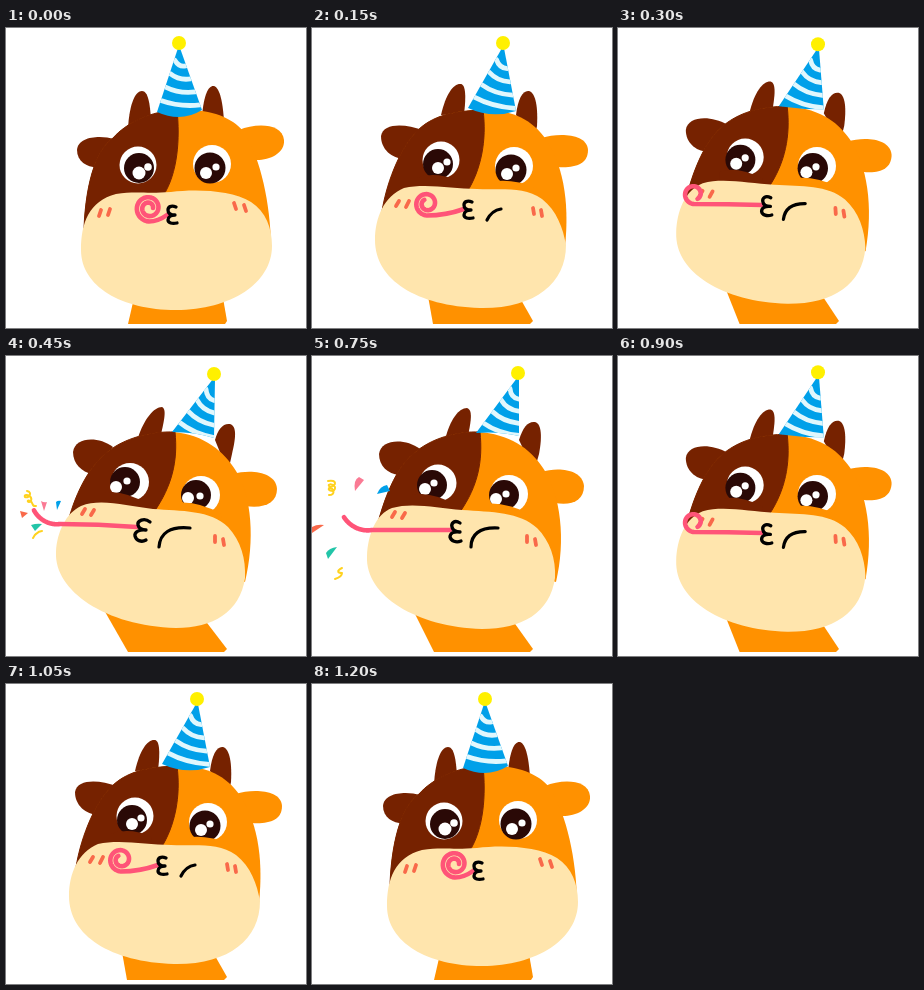
An HTML page with a canvas that plays this animation: 300 px wide and 300 px high, repeating every 1550 ms.

```html
<!DOCTYPE html>
<html lang="en">
<head>
<meta charset="utf-8">
<title>Party calf</title>
<style>
html, body { margin: 0; width: 100%; height: 100%; overflow: hidden; background: #fff; }
canvas { display: block; width: 300px; height: 300px; }
</style>
</head>
<body>
<canvas id="stage" width="300" height="300"></canvas>
<script>
const ctx = document.getElementById('stage').getContext('2d');
const BROWN = '#762200', ORANGE = '#ff9100', CREAM = '#ffe5ad', PINK = '#ff5478';
const BLUE = '#00a0e9', STRIPE = '#e0f7fd', BLUSH = '#f9694a', DARK = '#2a0906';

// Every pose shares the same structure, so any two can be blended number by number.
// hat: apex, left, right, base control; blower: mouth, coil centre, outer r, inner r, turns
const rest = {
  neck: 'M128 270L122 296L219 296L221 293L217 270Z',
  hornL: 'M122 101C123 80 128 63 136 63C142 63 144 75 145 92Z',
  hornR: 'M196 88C198 65 203 57 208 58C214 60 217 75 218 94L208 110Z',
  earL: 'M108 111C95 107 72 108 71 122C71 135 84 141 95 139Z',
  earR: 'M233 102C250 95 276 95 278 112C279 126 262 133 248 132Z',
  head: 'M78 200C80 150 92 120 107 110C120 95 145 83 171 82C200 80 225 88 237 103C252 125 263 165 265 212Z',
  patch: 'M78 200C80 150 92 120 107 110C120 95 145 83 171 82C174 110 172 145 157 168L110 200Z',
  eyes: '132 137 18.5 133 140 15 133 145 6.5 142 139 3.8 206 136 19 204 140 15.5 200 145 6 210 139 3.6',
  lidL: '',
  lidR: '',
  muzzle: 'M75 222C75 195 83 173 110 166C130 163 140 166 165 164C190 161 225 162 245 174C260 184 266 200 266 218C266 255 225 282 170 282C115 282 75 258 75 222Z',
  blush: 'M95 182L93 188M104 181L102 187M228 175L230 181M238 177L240 183',
  mouth: 'M170 179C165 177 162 179 162 182C162 186 166 187 169 187C165 187 162 189 162 192C162 195 166 196 171 195',
  crease: '',
  pom: '173 15 7',
  hat: '173 20 151 84 196 82 175 95',
  blower: '161 187 143 180 13.5 4 1.75'
};
const puff = {
  neck: 'M116 268L121 296L218 296L221 293L208 270Z',
  hornL: 'M129 87C134 65 142 55 149 56C154 57 154 70 152 86Z',
  hornR: 'M204 87C206 70 211 62 217 63C224 65 226 80 225 98L222 112Z',
  earL: 'M110 102C95 96 71 94 69 108C69 122 80 130 92 131Z',
  earR: 'M230 110C245 105 275 105 276 122C276 137 262 140 246 139Z',
  head: 'M69 190C73 157 88 120 105 103C120 88 140 83 168 82C200 81 220 92 233 110C250 135 258 170 253 219Z',
  patch: 'M69 190C73 157 88 120 105 103C120 88 140 83 171 82C175 112 169 142 155 164L100 200Z',
  eyes: '129 132 18.5 126 136 15 126 140 6 135 134 3.6 202 138 19 199 142 15.5 195 146 6 204 140 3.6',
  lidL: 'M104 150Q124 143 146 153L144 160L104 160Z',
  lidR: 'M178 154Q200 150 224 160L224 168L178 164Z',
  muzzle: 'M63 212C63 190 72 168 92 160C115 155 140 161 165 161C190 162 212 158 230 171C245 183 251 200 254 217C254 256 222 281 168 280C105 278 63 252 63 212Z',
  blush: 'M87 173L84 178M97 173L94 179M221 180L222 186M229 182L230 188',
  mouth: 'M160 174C155 172 152 174 152 177C152 181 156 182 159 182C155 182 152 184 152 187C152 190 156 191 161 190',
  crease: 'M175 192C178 186 182 182 189 181',
  pom: '191 15 7',
  hat: '191 20 156 80 204 83 180 91',
  blower: '152 181 115 175.5 12 4.5 1.4'
};
const blow = {
  neck: 'M98 254L122 296L218 296L221 293L198 263Z',
  hornL: 'M132 82C138 63 148 51 156 51C161 53 158 65 155 79Z',
  hornR: 'M209 84C212 73 217 67 224 68C231 70 230 82 226 98L222 116Z',
  earL: 'M107 91C92 80 69 81 67 96C67 108 76 116 86 118Z',
  earR: 'M227 118C245 113 270 116 271 133C271 147 258 153 239 150Z',
  head: 'M61 170C68 140 82 112 100 97C118 82 145 75 168 76C198 79 218 95 230 115C246 140 249 185 239 226Z',
  patch: 'M61 170C68 140 82 112 100 97C118 82 145 75 169 76C172 105 166 130 148 156L100 190Z',
  eyes: '124 126 19 119 126 15 110 131 6 121 125 3.6 195 139 19 190 139 15 182 142 6 194 140 3.6',
  lidL: 'M98 137Q116 133 142 148L142 152L98 148Z',
  lidR: 'M170 147Q190 144 216 158L214 166L170 160Z',
  muzzle: 'M50 196C51 176 60 157 75 150C95 142 120 150 147 153C175 155 205 154 222 171C235 185 240 203 239 222C234 256 207 272 170 272C100 270 48 235 50 196Z',
  blush: 'M79 153L76 158M88 154L85 159M209 180L209 186M217 183L218 189',
  mouth: 'M144 166C138 161 131 165 132 169C133 173 137 174 140 174C134 173 128 176 129 180C130 184 135 187 140 184',
  crease: 'M153 191C154 177 164 170 184 172',
  pom: '208 18 7',
  hat: '208 23 166 76 208 82 190 76',
  blower: '131 171 54 144 24 28 .19'
};
const hold = {
  neck: 'M102 256L122 296L218 296L221 293L201 265Z',
  hornL: 'M133 84C138 63 147 52 155 52C161 54 159 65 156 80Z',
  hornR: 'M207 84C211 71 216 65 223 66C230 68 230 82 227 98L222 116Z',
  earL: 'M108 93C93 82 69 83 67 98C67 110 76 118 87 119Z',
  earR: 'M229 116C246 111 270 113 272 130C272 145 259 150 243 147Z',
  head: 'M64 174C72 142 84 112 101 98C119 82 145 75 166 76C197 78 218 92 231 112C249 138 254 185 244 226Z',
  patch: 'M64 174C72 142 84 112 101 98C119 82 145 75 168 76C171 105 166 130 148 156L100 190Z',
  eyes: '126 127 18.5 120 129 15 113 133 6 122 127 3.6 197 138 19 192 139 15 184 143 6 194 138 3.6',
  lidL: 'M100 139Q118 135 144 149L144 153L100 150Z',
  lidR: 'M172 148Q192 145 218 158L216 166L172 160Z',
  muzzle: 'M55 200C56 178 64 158 80 152C100 146 125 152 150 154C180 156 208 156 225 172C238 185 244 203 243 222C238 257 210 273 170 273C105 271 53 240 55 200Z',
  blush: 'M83 156L80 161M93 157L90 162M215 180L215 186M223 183L224 189',
  mouth: 'M148 167C142 163 139 168 140 171C141 175 145 176 148 176C142 175 138 177 138 181C139 185 144 187 149 185',
  crease: 'M159 191C159 179 167 171 186 172',
  pom: '206 17 7',
  hat: '206 22 164 77 207 80 186 75',
  blower: '138 174 60 148 26 31 .18'
};

// Confetti: colour, start path, end path, stroked?
const confetti = [
  ['#ffd21f', 'M21 135C27 136 23 143 19 141C17 137 27 139 25 145C22 148 20 143 24 145C28 146 25 151 30 150',
    'M16 125C25 123 25 130 18 131C14 128 20 127 23 131C24 137 15 135 17 132C22 132 24 139 17 139', true],
  ['#ffd21f', 'M36 175C33 175 31 177 30 178C28 179 28 181 27 182',
    'M30 212C24 215 26 217 30 217C30 220 26 222 23 223', true],
  ['#f9694a', 'M14 155Q18 156 22 157L16 162Z', 'M0 171Q5 168 12 169L0 177Z'],
  ['#fa7a94', 'M35 145Q38 147 41 146L38 155Z', 'M43 135Q41 124 47 121L52 124Z'],
  [BLUE, 'M50 146Q52 144 55 145L51 154Z', 'M65 138Q68 130 75 129L78 135Z'],
  ['#22c5a8', 'M25 169Q31 167 36 168L29 175Z', 'M14 197Q17 192 25 191L16 203Z']
];

const NUMBER = /-?\d*\.?\d+/g;
const nums = s => s.match(NUMBER).map(Number);

function mix(a, b, t) {
  const to = nums(b);
  let i = 0;
  return a.replace(NUMBER, n => +n + (to[i++] - n) * t);
}

const blend = (a, b, t) =>
  Object.fromEntries(Object.keys(a).map(k => [k, mix(a[k], b[k], t)]));

const lean = { ...blend(puff, hold, .6), blower: '144 177 76 166 10 6 .9' };
const sway = { ...blend(blow, hold, .2), neck: blow.neck };
const steps = [
  [rest], [puff], [lean], [blow, 0], [sway, .5], [hold, 1], [lean], [puff], [rest]
];

function fill(path, color) {
  ctx.fillStyle = color;
  ctx.fill(new Path2D(path));
}

function line(path, color, width) {
  ctx.strokeStyle = color;
  ctx.lineWidth = width;
  ctx.stroke(new Path2D(path));
}

function disc(x, y, r, color) {
  ctx.fillStyle = color;
  ctx.beginPath();
  ctx.arc(x, y, r, 0, Math.PI * 2);
  ctx.fill();
}

function drawEyes(data) {
  const n = nums(data);
  const colors = ['#fff', DARK, '#fff', '#fff'];
  for (let i = 0; i < 8; i++) disc(...n.slice(i * 3, i * 3 + 3), colors[i % 4]);
}

function drawHat(data) {
  const [ax, ay, lx, ly, rx, ry, cx, cy] = nums(data);
  const shape = `M${ax - 1} ${ay}L${lx} ${ly}Q${cx} ${cy} ${rx} ${ry}L${ax + 1} ${ay}Z`;
  const bx = (lx + rx) / 2, by = (ly + ry) / 2;
  const slope = .1 + (ax - bx) * .0035; // stripes steepen as the hat tilts
  fill(shape, BLUE);
  ctx.save();
  ctx.clip(new Path2D(shape));
  for (const t of [.19, .4, .61, .82]) {
    const u = t + slope, m = t + slope / 2 + .07;
    const at = (x, y, k) => `${ax + (x - ax) * k} ${ay + (y - ay) * k}`;
    line(`M${at(lx, ly, t)}Q${at(bx, by, m)} ${at(rx, ry, u)}`, STRIPE, 4.8);
  }
  ctx.restore();
}

function drawBlower(data) {
  const [mx, my, cx, cy, r0, r1, turns] = nums(data);
  let path = `M${mx} ${my}Q${(mx + cx) / 2} ${cy + r0} ${cx} ${cy + r0}`;
  for (let i = 1; i <= 60; i++) {
    const k = i / 60, a = Math.PI * (.5 + 2 * turns * k), r = r0 + (r1 - r0) * k;
    path += `L${cx + r * Math.cos(a)} ${cy + r * Math.sin(a)}`;
  }
  line(path, PINK, 4.6);
}

function draw(pose, burst) {
  ctx.fillStyle = '#fff';
  ctx.fillRect(0, 0, 300, 300);
  fill(pose.neck, ORANGE);
  fill(pose.hornL, BROWN);
  fill(pose.hornR, BROWN);
  fill(pose.earL, BROWN);
  fill(pose.earR, ORANGE);
  fill(pose.head, ORANGE);
  fill(pose.patch, BROWN);
  line(pose.patch, BROWN, 1);
  drawHat(pose.hat);
  disc(...nums(pose.pom), '#fff000');
  drawEyes(pose.eyes);
  fill(pose.lidL, BROWN);
  fill(pose.lidR, ORANGE);
  fill(pose.muzzle, CREAM);
  line(pose.blush, BLUSH, 3.8);
  drawBlower(pose.blower);
  line(pose.mouth, '#000', 3.3);
  line(pose.crease, '#000', 3.2);
  if (burst === undefined) return;
  for (const [color, from, to, stroked] of confetti) {
    const path = mix(from, to, burst);
    if (stroked) line(path, color, 2);
    else fill(path, color);
  }
}

ctx.lineCap = ctx.lineJoin = 'round';

function tick() {
  const t = performance.now() % 1550;
  draw(...steps[Math.min(8, Math.floor(t / 150))]);
  requestAnimationFrame(tick);
}
tick();
</script>
</body>
</html>
```
